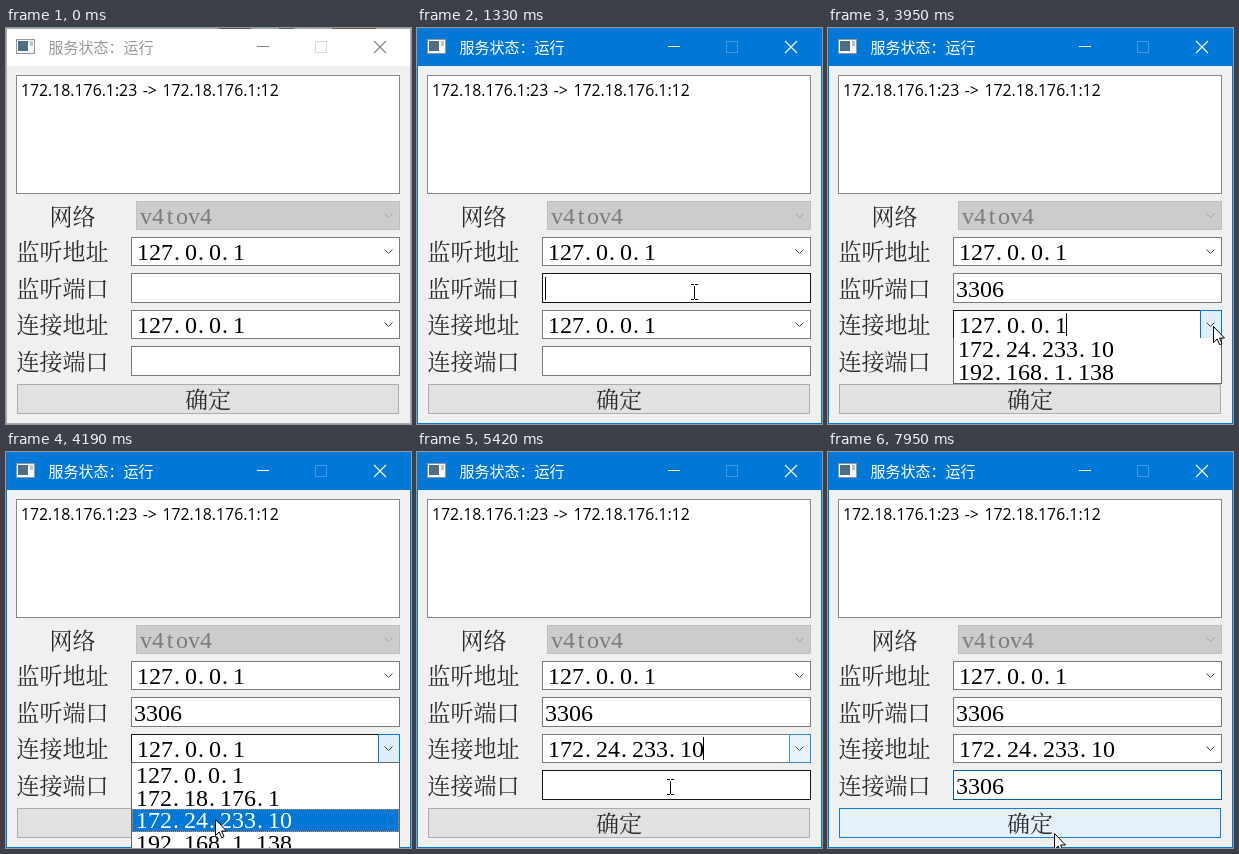
Write an HTML page with a canvas that moves like this. It is 405 px wide and 396 px high and loops after 8000 ms.

```html
<!DOCTYPE html>
<html lang="zh">
<head>
<meta charset="utf-8">
<style>
html, body { margin: 0; width: 100%; height: 100%; overflow: hidden; background: #f0f0f0; }
canvas { display: block; }
</style>
</head>
<body>
<canvas id="stage" width="405" height="396"></canvas>
<script>
const ctx = document.getElementById('stage').getContext('2d');
const LOOP = 8000, BLINK = 560, FADE = 200;
const BLUE = [0, 120, 215], GRAY = [122, 122, 122], DARK = [23, 23, 23];
const CJK = '"Noto Sans CJK SC", "Noto Sans CJK", sans-serif';
const SONG = '"Noto Serif CJK SC", ' + CJK;
const ADDRESSES = ['127.0.0.1', '172.18.176.1', '172.24.233.10', '192.168.1.138'];

// Focus click followed by the four key presses of each port field
const LISTEN_KEYS = [1050, 1980, 2180, 2410, 2640];
const TARGET_KEYS = [5570, 6360, 6540, 6730, 6960];
const OPEN = 3870, PICK = 5140;

// Pointer path: time, x, y
const PATH = [
  [300, 205, 400], [690, 263, 278], [900, 277, 264], [1330, 277, 264], [1380, 281, 268],
  [3380, 281, 268], [3720, 384, 303], [3910, 387, 303], [3950, 386, 298], [4190, 209, 367],
  [4450, 222, 384], [4670, 227, 384], [4820, 232, 373], [5140, 232, 373], [5260, 253, 335],
  [5420, 253, 335], [5600, 264, 334], [7530, 264, 334], [7580, 268, 328], [7720, 268, 328],
  [7950, 226, 381]
];

const listenBox = [125, 245, 269, 30], targetBox = [125, 318, 269, 30];
const listenCombo = [125, 209, 269, 29], targetCombo = [125, 282, 269, 29];
const button = [11, 356, 382, 30];

const clamp = v => Math.max(0, Math.min(1, v));
const mix = (a, b, k) => `rgb(${a.map((v, i) => Math.round(v + (b[i] - v) * k))})`;
const popupOpen = t => t >= OPEN && t < PICK;

function pointer(t) {
  const i = PATH.findIndex(p => p[0] > t);
  if (i === 0) return PATH[0].slice(1);
  if (i < 0) return PATH[PATH.length - 1].slice(1);
  const [t0, x0, y0] = PATH[i - 1], [t1, x1, y1] = PATH[i];
  const k = (t - t0) / (t1 - t0);
  return [x0 + (x1 - x0) * k, y0 + (y1 - y0) * k];
}

// An open popup keeps its combo box lit and blocks everything else
function over(t, box) {
  if (popupOpen(t)) return box === targetCombo;
  const [x, y, w, h] = box, [px, py] = pointer(t);
  return px >= x && px < x + w && py >= y && py < y + h;
}

// Share of the recent past spent over the box: a linear fade in and out
function hover(t, box) {
  let n = 0;
  for (let i = 0; i < 24; i++) n += over(t - i * FADE / 24, box);
  return n / 24;
}

function rect([x, y, w, h], fill, border) {
  ctx.fillStyle = fill;
  ctx.fillRect(x, y, w, h);
  if (!border) return;
  ctx.strokeStyle = border;
  ctx.lineWidth = 1;
  ctx.strokeRect(x + .5, y + .5, w - 1, h - 1);
}

function line(color, width, ...points) {
  ctx.strokeStyle = color;
  ctx.lineWidth = width;
  ctx.beginPath();
  points.forEach(([x, y]) => ctx.lineTo(x, y));
  ctx.stroke();
}

function text(str, x, y, font, color = '#000', align = 'left') {
  ctx.font = font;
  ctx.fillStyle = color;
  ctx.textAlign = align;
  ctx.fillText(str, x, y);
}

// Half-width characters in 12 px cells
function mono(str, x, y, color = '#000') {
  ctx.font = '24px "Liberation Serif", serif';
  ctx.fillStyle = color;
  ctx.textAlign = 'left';
  [...str].forEach((c, i) => {
    const inset = c === '.' ? 1 : (12 - ctx.measureText(c).width) / 2;
    ctx.fillText(c, x + i * 12 + inset, y);
  });
}

const label = (str, x, y, align) => text(str, x, y + 8.5, '100 23px ' + SONG, '#2a2a2a', align);
const caret = (x, y) => rect([x, y, 1, 23], '#000');
const chevron = (y, color) => line(color, 1, [378.5, y - 2], [382.5, y + 2], [386.5, y - 2]);

function titleBar(active) {
  const edge = active ? '#0078d7' : '#a9a9a9';
  rect([0, 0, 405, 396], '#f0f0f0', edge);
  rect([1, 1, 403, 37], active ? '#0078d7' : '#fff');
  if (!active) {
    rect([213, 0, 32, 1], '#555');
    rect([273, 0, 15, 1], '#4c6472');
    rect([326, 0, 44, 1], '#75583c');
  }
  rect([10, 11, 19, 15], '#f8f8f8', '#8d979e');
  rect([12, 13, 10, 10], '#4f6f80');
  rect([24, 13, 3, 5], '#b9c4ca');
  text('服务状态：运行', 42.5, 24.5, '15px ' + CJK, active ? '#fff' : '#999');
  const ink = active ? '#fff' : '#808080';
  line(ink, 1, [251, 18.5], [263, 18.5]);
  ctx.strokeStyle = active ? '#3f9ae2' : '#dcdcdc';
  ctx.strokeRect(309.5, 13.5, 11, 11);
  line(ink, 1.1, [368, 13], [380, 25]);
  line(ink, 1.1, [380, 13], [368, 25]);
}

function portField(t, box, keys, blur) {
  const focused = t >= keys[0] && t < blur;
  const past = keys.filter(k => k <= t);
  const typed = Math.max(0, past.length - 1);
  const [x, y] = box;
  rect(box, '#fff', mix(focused ? BLUE : GRAY, DARK, hover(t, box)));
  mono('3306'.slice(0, typed), x + 3, y + 24);
  if (focused && (t - past[typed]) % (2 * BLINK) < BLINK) caret(x + 3 + typed * 12, y + 4);
}

function combo(t, box, value) {
  rect(box, '#fff', mix(GRAY, DARK, hover(t, box)));
  mono(value, 131, box[1] + 23);
}

function popup(t) {
  const row = 22.67, top = 311, full = 92;
  const shown = Math.round(full * clamp((t - OPEN) / 165));
  const current = Math.min(3, Math.max(0, Math.floor((pointer(t)[1] - 312) / row)));
  ctx.save();
  ctx.beginPath();
  ctx.rect(125, top - 1, 269, shown + 1);
  ctx.clip();
  const base = top + shown - full;
  rect([125, base - 1, 269, full + 1], '#fff', '#646464');
  ADDRESSES.forEach((address, i) => {
    const y = Math.round(base + 1 + i * row);
    if (i === current) {
      rect([126, y, 267, 23], '#0078d7');
      ctx.setLineDash([1, 1]);
      ctx.lineDashOffset = .5;
      ctx.strokeStyle = '#ff8728';
      ctx.strokeRect(126.5, y + .5, 266, 22);
      ctx.setLineDash([]);
    }
    mono(address, 130, y + 19, i === current ? '#fff' : '#000');
  });
  ctx.restore();
}

const arrow = new Path2D('M.5 .5V16.5L4.2 13L6.7 18.7L9 17.7L6.6 12H11.5Z');

function drawPointer(t) {
  if (t < PATH[0][0]) return;
  const [x, y] = pointer(t).map(Math.round);
  const editable = [listenBox, targetBox, [125, 282, 247, 29]];
  ctx.save();
  ctx.translate(x, y);
  if (editable.some(box => over(t, box))) {
    line('#000', 1, [.5, -6], [.5, 7]);
    for (const s of [-7.5, 7.5]) {
      line('#000', 1, [-3, s], [0, s]);
      line('#000', 1, [1, s], [4, s]);
    }
  } else {
    ctx.fillStyle = '#fff';
    ctx.strokeStyle = '#000';
    ctx.lineWidth = 1;
    ctx.fill(arrow);
    ctx.stroke(arrow);
  }
  ctx.restore();
}

function draw(t) {
  titleBar(t >= LISTEN_KEYS[0]);
  rect([10, 47, 384, 119], '#fff', '#828790');
  ctx.wordSpacing = '1.5px';
  text('172.18.176.1:23 -> 172.18.176.1:12', 15, 68, '15.8px "Open Sans", sans-serif');
  ctx.wordSpacing = '0px';

  label('网络', 43.5, 188);
  ['监听地址', '监听端口', '连接地址', '连接端口'].forEach((s, i) => label(s, 10.5, 223.5 + i * 36.5));

  rect([130, 173, 264, 29], '#ccc', '#bfbfbf');
  mono('v4tov4', 134, 196, '#7c7c7c');
  chevron(187.5, '#a3a3a3');

  combo(t, listenCombo, ADDRESSES[0]);
  chevron(223.5, '#404040');
  portField(t, listenBox, LISTEN_KEYS, OPEN);

  combo(t, targetCombo, ADDRESSES[t < PICK ? 0 : 2]);
  const arrowBox = [372, 282, 22, 29];
  const lit = popupOpen(t) ? 1 : t >= PICK ? clamp(1.3 - (t - PICK) / 500) : hover(t, arrowBox);
  if (lit) {
    ctx.globalAlpha = lit;
    rect(arrowBox, '#e0eefa', '#0078d7');
    ctx.globalAlpha = 1;
  }
  chevron(296.5, '#404040');
  if (t >= OPEN && t < 4040) caret(238, 285);
  if (t >= PICK && t < TARGET_KEYS[0]) caret(286, 285);
  portField(t, targetBox, TARGET_KEYS, LOOP);

  const warm = clamp(hover(t, button) * 1.6);
  rect(button, mix([225, 225, 225], [229, 241, 251], warm), mix([173, 173, 173], BLUE, warm));
  label('确定', 202, 371, 'center');

  if (popupOpen(t)) popup(t);
  drawPointer(t);
}

const start = performance.now();
function tick() {
  draw((performance.now() - start) % LOOP);
  requestAnimationFrame(tick);
}
tick();
</script>
</body>
</html>
```
